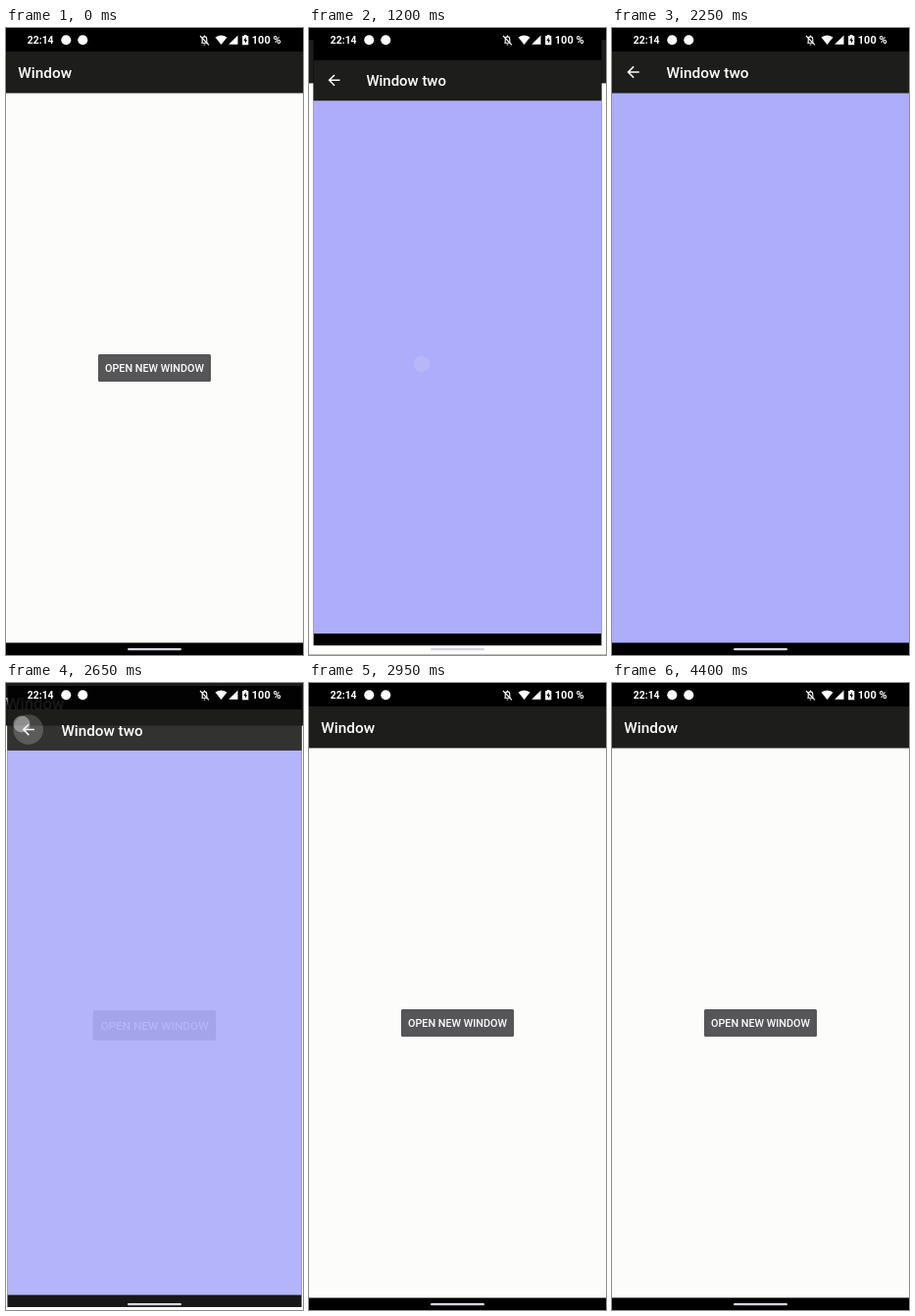
Animation, 303 px wide and 640 px high, one loop 4.45 s. Source, as an HTML page:

```html
<!DOCTYPE html>
<html lang="en">
<head>
<meta charset="utf-8">
<title>Window</title>
<style>
  html, body { margin: 0; width: 100%; height: 100%; overflow: hidden; background: #000; }
  svg { display: block; width: 100%; height: 100%; }
  text { font-family: Roboto, "Open Sans", sans-serif; font-weight: 500; fill: #fff; }
  .title { font-size: 15.4px; }
  .label { font-size: 10.8px; }
  #status text { font-weight: 600; }
</style>
</head>
<body>
<svg viewBox="0 0 303 640">
  <g id="first">
    <rect width="303" height="640"/>
    <rect y="66" width="303" height="561.5" fill="#fcfcfb"/>
    <rect y="24" width="303" height="42.5" fill="#1d1d1b"/>
    <text class="title" x="12.3" y="51.3">Window</text>
    <rect x="94" y="333" width="115" height="28" rx="1.5" fill="#565557"/>
    <text class="label" x="151.5" y="351.3" text-anchor="middle">OPEN NEW WINDOW</text>
  </g>

  <g id="second">
    <rect width="303" height="640"/>
    <rect y="66" width="303" height="561.5" fill="#adadfb"/>
    <rect y="24" width="303" height="42.5" fill="#1d1d1b"/>
    <circle id="ripple" cx="21.6" cy="45" r="15.4" fill="#fff"/>
    <path transform="translate(12.3 35.75) scale(.771)" fill="#fff"
      d="M20 11H7.83l5.59-5.59L12 4l-8 8 8 8 1.41-1.41L7.83 13H20z"/>
    <text class="title" x="55.5" y="51.3">Window two</text>
  </g>

  <g id="status" fill="#fff">
    <text x="21.8" y="16.2" font-size="10.4">22:14</text>
    <circle cx="61.3" cy="12.3" r="5"/>
    <circle cx="78.3" cy="12.3" r="5"/>
    <g fill="none" stroke="#fff" stroke-width="1.1">
      <path d="M199.3 15.2h6.4M200.2 15v-3.2c0-1.8 1-2.9 2.3-2.9s2.3 1.1 2.3 2.9V15M202.5 8.9V7.5M201.7 17h1.6"/>
      <path d="M198 8l9 9.3"/>
    </g>
    <path d="M213.5 9.6Q219.5 5.4 225.5 9.6L219.5 17Z"/>
    <path d="M236.5 7.5V16.7H227.2Z"/>
    <path d="M242.8 8v-1h2.8v1h1.7v9.3h-6.2V8z"/>
    <path d="M244.7 9.3l-2.3 3.6h1.5v2.9l2.2-3.6h-1.4z" fill="#000"/>
    <text x="250.8" y="16.4" font-size="11">100 %</text>
  </g>
  <rect x="124" y="633" width="55" height="2.3" rx="1.15" fill="#d6d6e0"/>
  <circle id="touch" r="8.5" fill="#e6e6ee"/>
</svg>
<script>
const LOOP = 4450, STEP = 50, SPAN = 400;
const OPEN = 1094, CLOSE = 2610;
const taps = [
  { at: 1050, x: 115, y: 343 },
  { at: 2600, x: 16, y: 42 }
];
const tapFade = [.55, .45, .35, .18];

const $ = id => document.getElementById(id);
const clamp = v => Math.min(1, Math.max(0, v));
const mix = (a, b, p) => a + (b - a) * p;

const cubic = ([a, b, c, d], u) => {
  const v = 1 - u;
  return a * v * v * v + 3 * b * v * v * u + 3 * c * v * u * u + d * u * u * u;
};

// Two-part curve: quick start, very slow finish.
const curve = [
  { x: [0, .05, .1333, .1667], y: [0, 0, .06, .4] },
  { x: [.1667, .2083, .25, 1], y: [.4, .82, 1, 1] }
];

function ease(t) {
  if (t <= 0) return 0;
  if (t >= 1) return 1;
  const part = curve[t < .1667 ? 0 : 1];
  let lo = 0, hi = 1;
  for (let i = 0; i < 24; i++) {
    const mid = (lo + hi) / 2;
    if (cubic(part.x, mid) < t) lo = mid; else hi = mid;
  }
  return cubic(part.y, lo);
}

function pose(el, scale, alpha = 1) {
  el.setAttribute("transform",
    `translate(151.5 320) scale(${scale}) translate(-151.5 -320)`);
  el.setAttribute("opacity", alpha);
}

function draw(t) {
  if (t < CLOSE) {
    const p = ease((t - OPEN) / SPAN);
    pose($("first"), mix(1, 1.05, p));
    pose($("second"), mix(.85, 1, p), clamp((t - OPEN - 50) / 50));
  } else {
    const p = ease((t - CLOSE) / SPAN);
    pose($("first"), mix(1.1, 1, p));
    pose($("second"), mix(1, .9, p), 1 - clamp((t - CLOSE - 35) / 50));
  }

  const tap = taps[t < 2000 ? 0 : 1];
  const touch = $("touch");
  touch.setAttribute("cx", tap.x);
  touch.setAttribute("cy", tap.y);
  touch.setAttribute("opacity", tapFade[Math.floor((t - tap.at) / STEP)] || 0);
  $("ripple").setAttribute("opacity", .2 * clamp((t - 2575) / 50));
}

const start = performance.now();
function tick() {
  const t = (performance.now() - start) % LOOP;
  draw(Math.floor(t / STEP) * STEP);
  requestAnimationFrame(tick);
}
tick();
</script>
</body>
</html>
```
